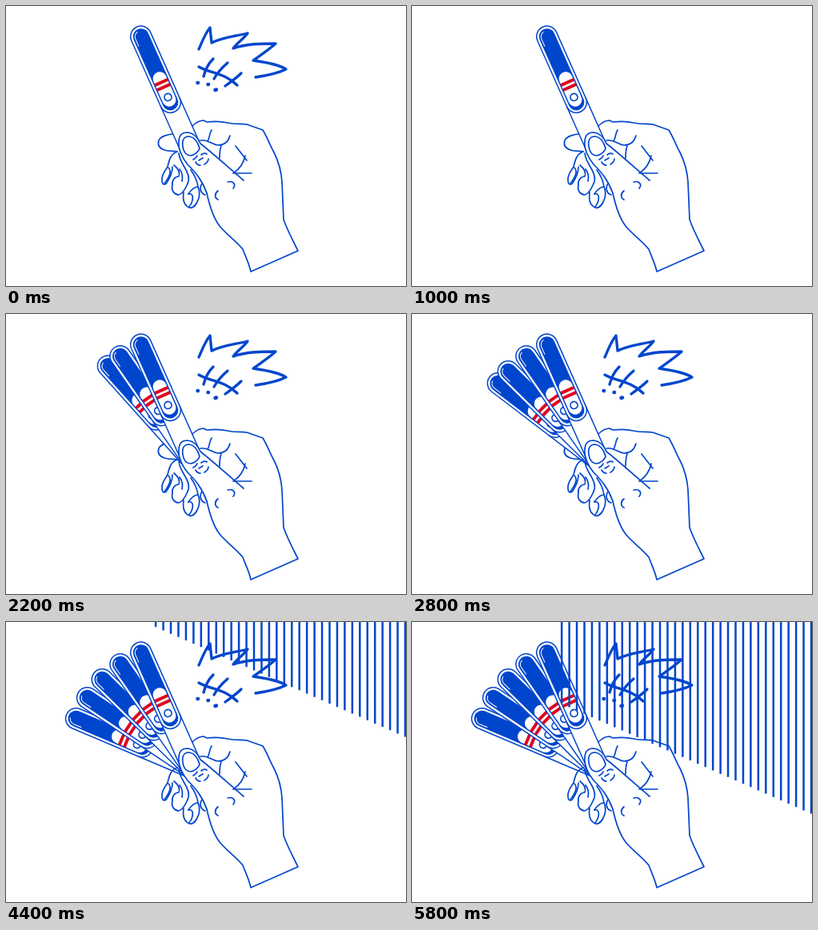
Animation of 500 by 350 pixels, one loop 8.8 s. Source, as an HTML page:

```html
<!DOCTYPE html>
<html lang="en">
<head>
<meta charset="utf-8">
<title>Hand with test sticks</title>
<style>
  html, body { margin: 0; width: 100%; height: 100%; overflow: hidden; background: #fff; }
  svg { display: block; width: 100%; height: 100%; }
  .line { fill: none; stroke: #0046cd; stroke-width: 1.7; stroke-linecap: round; stroke-linejoin: round; }
  .paper { fill: #fff; }
  .ink { fill: #0046cd; }
  .thin { stroke-width: 1.5; }
  .bold { stroke-width: 3.3; }
  .bars { stroke: #e00420; stroke-width: 4; fill: none; }
  .shine { stroke: #fff; stroke-width: 1; fill: none; stroke-linecap: round; }
</style>
</head>
<body>
<svg viewBox="0 0 500 350">
  <defs>
    <!-- A stick stands upright on the point it turns about. -->
    <g id="stick">
      <path class="line thin paper" d="M-13 0V-158A13 13 0 0 1 13-158V0"/>
      <path class="line thin" d="M-13-68A13 13 0 0 0 13-68"/>
      <rect class="ink" x="-10" y="-168" width="20" height="110" rx="10"/>
      <path class="shine" d="M-7.5-148V-158A7.5 7.5 0 0 1-2-165"/>
      <rect class="paper" x="-8.5" y="-109" width="17" height="46" rx="8.5"/>
      <path class="bars" d="M-9-95.3H9M-9-88.6H9"/>
      <circle class="line" cy="-75" r="4.5"/>
    </g>
  </defs>

  <path class="line" d="M210 160C203 160 193 163 191 168C189 174 192 178 198 180C204 182 209 181 214 182"/>

  <g id="sticks"></g>

  <g class="line">
    <!-- curled fingers -->
    <path d="M214 182C206 185 204 192 202 201C199 206 194 211 195 218C195 224 199 224 201 221C205 214 208 209 208 201"/>
    <path d="M203 202C207 206 205 213 198 222M210 199C215 203 218 208 216 213C211 213 207 218 208 224C206 231 211 236 216 236C221 235 224 229 227 222"/>
    <path d="M216 184C217 194 223 200 226 207C229 213 229 218 227 222M217 204C221 209 221 214 220 219"/>
    <path d="M222 233C221 240 222 247 226 250C231 255 236 251 239 245C243 238 242 230 240 226C236 226 232 229 228 235"/>
    <path d="M228 235C235 233 235 243 229 251M231 205C237 213 239 219 240 226M245 222C241 228 244 235 249 236"/>

    <!-- thumb -->
    <path class="paper" stroke="none" d="M251 234C245 217 236 207 227 198C221 191 215 179 216 170C216 162 220 158 227 158C236 159 240 165 243 172C255 181 276 200 297 218Z"/>
    <path d="M251 234C245 217 236 207 227 198C221 191 215 179 216 170C216 162 220 158 227 158C236 159 240 165 243 172C255 181 276 200 297 218"/>
    <path d="M222 180C219 170 221 163 229 163C236 164 240 171 242 178C241 182 236 186 231 187C227 187 224 185 222 180Z"/>
    <path d="M234 192Q238 190 239 187M244 186Q248 183 251 185M237 195Q239 199 243 199M248 198Q253 195 253 191M241 193L246 190"/>

    <!-- back of the hand and wrist -->
    <path d="M233 150C237 146 242 143 247 143L251 145C260 144 269 144 277 146C285 148 293 147 301 148L321 155C327 165 330 174 335 183C341 195 344 205 345 220L347 267C352 281 359 294 365 306L306 332C304 322 300 315 296 304C286 292 275 285 267 275C260 266 255 252 251 234"/>
    <path d="M257 155C254 159 255 164 252 169M243 168C252 166 256 173 265 174C273 174 278 169 280 162M269 175C267 180 267 185 267 190"/>
    <path d="M287 175L301 193M299 187C297 197 292 204 284 209H307"/>
    <path d="M265 231C260 235 261 240 265 242M277 220C284 218 288 223 284 228"/>
  </g>

  <g id="scribble">
    <path class="line bold" d="M241 54C245 45 249 34 255 27L257 46C271 39 286 38 302 34C297 41 289 46 284 53C301 47 319 47 337 47C328 55 319 61 309 68C323 70 341 73 350 79C340 84 326 87 312 89"/>
    <path class="line bold" d="M241 76C254 84 273 83 289 99M259 66C253 72 249 80 247 88M277 71C270 77 264 84 260 91M294 84C288 90 281 95 274 100"/>
    <path class="line" style="stroke-width:4.5" d="M239.500 96h.5M252.500 98h.5M261.500 105l1.500-.5"/>
  </g>

  <path id="stripes" class="line" style="stroke-width:2.5;stroke-linecap:butt"/>
</svg>

<script>
  const LOOP = 8800, STEP = 200;
  const STICKS = 5, FIRST_ANGLE = 24, SPREAD = 10.75;
  const STRIPES = 34, PITCH = 9.45, SLOPE = 0.44;

  const find = id => document.getElementById(id);
  const clamp = (v, low, high) => Math.min(high, Math.max(low, v));

  // The rearmost stick comes first so that the front one covers it.
  const sticks = [];
  for (let k = STICKS - 1; k >= 0; k--) {
    const use = document.createElementNS('http://www.w3.org/2000/svg', 'use');
    use.setAttribute('href', '#stick');
    find('sticks').append(use);
    sticks[k] = use;
  }

  function drawSticks(step) {
    const opened = clamp((step - 6) / 3, 0, STICKS - 1);
    sticks.forEach((stick, k) => {
      const angle = FIRST_ANGLE + SPREAD * Math.min(k, opened);
      stick.setAttribute('transform', `translate(233 182.500) rotate(${-angle})`);
      stick.style.display = k > Math.ceil(opened) ? 'none' : '';
    });
  }

  function drawStripes(step) {
    const fall = clamp((step - 16) / 6, 0, 1);
    const secondFall = clamp((step - 23) / 6, 0, 1);
    const reach = 144 * fall ** 1.1 + 96 * secondFall ** 1.5;
    let path = '';
    for (let i = 0; i < STRIPES; i++) {
      const x = 499 - i * PITCH;
      const bottom = reach - SLOPE * (500 - x);
      if (bottom > 0) path += `M${x} 0V${bottom}`;
    }
    find('stripes').setAttribute('d', path);
  }

  function frame() {
    const step = Math.floor(performance.now() % LOOP / STEP);
    const blinkedOff = step < 6 && step % 2 === 1;
    find('scribble').style.display = blinkedOff ? 'none' : '';
    drawSticks(step);
    drawStripes(step);
    requestAnimationFrame(frame);
  }
  frame();
</script>
</body>
</html>
```
